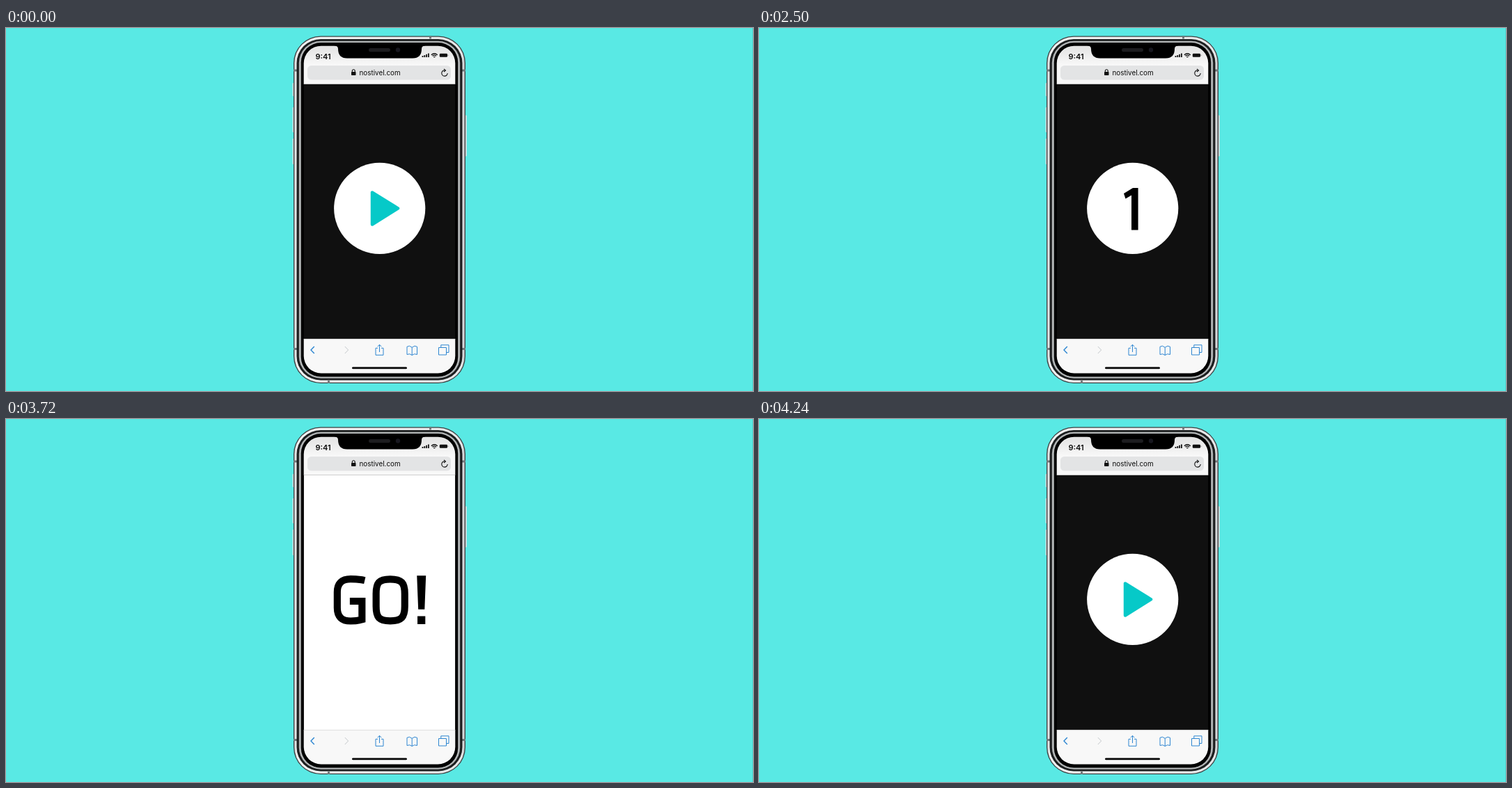
These frames come from a looping animation (1073x522 px, 4.74 s). An HTML page:

```html
<!DOCTYPE html>
<html lang="en">
<head>
<meta charset="utf-8">
<title>Countdown</title>
<style>
  html, body { margin: 0; width: 100%; height: 100%; overflow: hidden; background: #59e9e4; }
  svg { display: block; width: 100%; height: 100%; }
  text { font-family: Inter, "Liberation Sans", sans-serif; fill: #0b0b0b; }
  .line { fill: none; stroke: #2e86d1; stroke-width: 1; }
  .glyph { fill: none; stroke: #000; stroke-width: 9; }
  .solid { fill: #000; stroke: none; }
</style>
</head>
<body>
<svg viewBox="0 0 1073 522">
  <defs>
    <linearGradient id="topBar" x1="0" y1="0" x2="0" y2="1">
      <stop offset="0" stop-color="#e2e2e2"/><stop offset=".5" stop-color="#f8f8f8"/>
    </linearGradient>
    <linearGradient id="steel" x1="0" y1="0" x2="1" y2="0">
      <stop offset="0" stop-color="#d2d5d6"/><stop offset=".015" stop-color="#f1f2f2"/>
      <stop offset=".985" stop-color="#e6e7e8"/><stop offset="1" stop-color="#c4c7c9"/>
    </linearGradient>
    <clipPath id="screen"><rect x="427.7" y="25.7" width="217.6" height="470.8" rx="25"/></clipPath>
    <clipPath id="view"><rect x="427.7" y="80.7" width="217.6" height="366.3"/></clipPath>
  </defs>
  <rect x="1072" width="1" height="522" fill="#50d2cd"/>

  <!-- phone body -->
  <g fill="#d9dcdd">
    <rect x="411.7" y="79" width="3" height="19" rx="1"/>
    <rect x="411.7" y="114" width="3" height="36" rx="1"/>
    <rect x="411.7" y="159" width="3" height="37" rx="1"/>
    <rect x="658.5" y="125.5" width="3.2" height="59" rx="1"/>
  </g>
  <rect x="413" y="11.5" width="247" height="499.5" rx="39" fill="#3d4143"/>
  <rect x="414.3" y="12.8" width="244.4" height="496.9" rx="37.7" fill="url(#steel)"/>
  <g fill="#73787a">
    <rect x="413" y="59.5" width="5" height="3"/><rect x="655" y="59.5" width="5" height="3"/>
    <rect x="413" y="460" width="5" height="3"/><rect x="655" y="460" width="5" height="3"/>
    <rect x="608" y="11.5" width="3" height="4"/><rect x="462" y="507" width="3" height="4"/>
  </g>
  <rect x="417.5" y="16" width="238" height="490.5" rx="34.5" fill="#1c1e1f"/>
  <rect x="420.8" y="18.8" width="231.4" height="484.9" rx="31.5" fill="#b3b6b7"/>
  <rect x="423.8" y="21" width="225.4" height="480.5" rx="28.5" fill="#000"/>

  <g clip-path="url(#screen)">
    <rect x="427" y="25" width="219" height="56" fill="url(#topBar)"/>
    <rect x="427" y="447" width="219" height="50" fill="#f8f8f8"/>

    <g clip-path="url(#view)">
      <g id="goPage">
        <rect x="427" y="80" width="219" height="367" fill="#101010"/>
        <circle id="burst" cx="536.7" cy="259.3" r="65.6" fill="#fff"/>
        <g id="go" class="glyph" role="img" aria-label="GO!">
          <path d="M518 235C511 233.4 505 233.2 500 233.2Q483 233.2 483 250V270Q483 286.8 500 286.8Q508 286.8 514.5 285V261.5H499"/>
          <path d="M550.5 233.4C565 233.4 569 238 569 252V268C569 282 565 286.7 550.5 286.7C536 286.7 532.5 282 532.5 268V252C532.5 238 536 233.4 550.5 233.4Z"/>
          <path class="solid" d="M584.5 229H596L594.3 272H586.2ZM585.2 280.5H595.2V290.8H585.2Z"/>
        </g>
      </g>
      <g id="homePage">
        <rect x="427" y="80" width="219" height="367" fill="#101010"/>
        <circle cx="536.7" cy="259.3" r="65.6" fill="#fff"/>
        <path id="play" d="M526 236.5V282.5L563 259.3Z" fill="#06c9c8" stroke="#06c9c8" stroke-width="4.5" stroke-linejoin="round"/>
        <path id="three" class="glyph" d="M520 235C527 233.3 533 233 537 233Q551 233 551 245V248Q551 259 539 259H527M539 259Q551.5 259 551.5 271V274Q551.5 286.5 537 286.5C531 286.5 526 286 519.5 284.5"/>
        <path id="two" class="glyph" d="M520 235C527 233.3 533 233 538 233Q551 233 551 245V247Q551 255 543 259L530 266Q523 269.5 523 278V286H556"/>
        <path id="one" class="solid" d="M537 230H544.6V290.5H535V240.5L526.5 245.5L524 238Z"/>
      </g>
    </g>
    <path d="M427 447.3H646" stroke="#c9cccc" stroke-width=".6"/>

    <!-- status and address bars -->
    <text x="444.5" y="45" font-size="11" font-weight="600">9:41</text>
    <path d="M598.5 42V40M601.3 42V39M604.1 42V37.8M606.9 42V36.5" stroke="#111" stroke-width="1.8"/>
    <path d="M610.8 38.7Q615.3 34.8 619.8 38.7M612.5 40.3Q615.3 38 618.1 40.3M614.2 41.6H616.4" fill="none" stroke="#111" stroke-width="1.3"/>
    <rect x="622.8" y="36.8" width="11.2" height="5" rx="1.3" fill="#111"/>
    <path d="M635 38.3V40.3" stroke="#777" stroke-width=".8"/>
    <rect x="433" y="54" width="206" height="20.5" rx="5.5" fill="#e3e4e5"/>
    <rect x="496" y="63" width="6.5" height="5" rx=".8" fill="#111"/>
    <path d="M497.3 63V61.7A1.95 1.95 0 0 1 501.2 61.7V63" fill="none" stroke="#111" stroke-width="1.1"/>
    <text x="507.5" y="67.5" font-size="9.9">nostivel.com</text>
    <path d="M630.5 60.8A4.2 4.2 0 1 0 634.2 65M629 58.8L631.5 60.9L629 63" fill="none" stroke="#111" stroke-width="1.1"/>

    <!-- toolbar -->
    <path class="line" style="stroke-width:1.4" d="M442.8 458L438 463L442.8 468"/>
    <path class="line" style="stroke:#c5c9cc" d="M486.8 458L491.6 463L486.8 468"/>
    <path class="line" d="M534 460.3H531V470.3H542V460.3H539M536.5 466V455.5M533.7 458.2L536.5 455.3L539.3 458.2"/>
    <path class="line" d="M583.2 459.3Q579.5 455.8 576 458.3V469.5Q580 467.5 583.2 470.5Q586.5 467.5 590.5 469.5V458.3Q587 455.8 583.2 459.3V470.5"/>
    <path class="line" d="M621.5 459.5H632.5V470H621.5ZM624.8 459.5V455.8H636V466.5H632.5"/>
    <rect x="497" y="487.5" width="79" height="2.8" rx="1.4" fill="#050505"/>
  </g>

  <!-- notch -->
  <path d="M472 24V25.5Q477 25.5 477 30Q477 43.5 490 43.5H584Q597 43.5 597 30Q597 25.5 602 25.5V24Z" fill="#000"/>
  <rect x="521" y="29" width="31" height="5.2" rx="2.6" fill="#1d1d20"/>
  <circle cx="563" cy="31.5" r="3.2" fill="#17171f"/>
</svg>
<script>
const LOOP = 4740, PAGE_HEIGHT = 366.5;
const $ = id => document.getElementById(id);
const progress = (t, from, to) => Math.min(1, Math.max(0, (t - from) / (to - from)));
const sineInOut = p => (1 - Math.cos(Math.PI * p)) / 2;
const cubicInOut = p => p < .5 ? 4 * p ** 3 : 1 - 4 * (1 - p) ** 3;
const show = (id, on) => $(id).setAttribute("visibility", on ? "inherit" : "hidden");
const slide = (id, y) => $(id).setAttribute("transform", `translate(0 ${y})`);

function draw(t) {
  const going = t >= 3500 && t < 4240;
  show("play", t < 500 || t >= 3500);
  show("three", t >= 500 && t < 1500);
  show("two", t >= 1500 && t < 2500);
  show("one", t >= 2500 && t < 3500);
  show("goPage", going);

  const grow = sineInOut(progress(t, 3490, 3800));
  $("burst").setAttribute("r", 65.6 + 212 * grow);
  $("go").setAttribute("transform", `translate(536.7 260.3) scale(${1 + .15 * grow}) translate(-537 -260)`);

  const push = PAGE_HEIGHT * cubicInOut(progress(t, 3977, 4240));
  slide("goPage", push);
  slide("homePage", going ? push - PAGE_HEIGHT : 0);
}

const start = performance.now();
function tick() {
  draw((performance.now() - start) % LOOP);
  requestAnimationFrame(tick);
}
tick();
</script>
</body>
</html>
```
